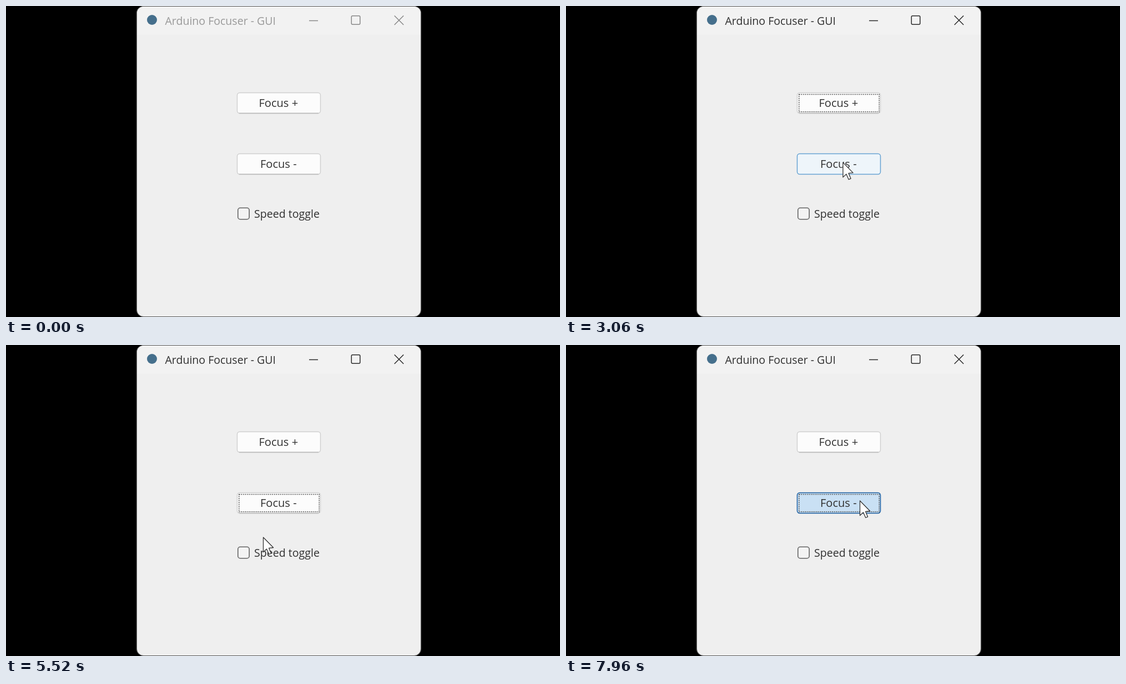
These frames come from a looping animation (998x561 px, 8 s). An HTML page:

```html
<!DOCTYPE html>
<html lang="en">
<head>
<meta charset="utf-8">
<title>Focuser window</title>
<style>
  html, body { margin: 0; width: 100%; height: 100%; overflow: hidden; background: #000; }
  svg { display: block; width: 100%; height: 100%; }
  text { font-family: "Open Sans", "Noto Sans", sans-serif; fill: #303030; }
  .button text { font-size: 20.1px; text-anchor: middle; }
  .dots { fill: none; stroke: #444; stroke-width: 1.5; stroke-dasharray: 1.75; }
</style>
</head>
<body>
<svg viewBox="0 0 998 561">
  <clipPath id="frame"><rect x="236" y="1" width="511" height="559" rx="12"/></clipPath>
  <rect x="235.5" y=".7" width="512" height="559.6" rx="12.5" fill="none" stroke="#555" stroke-width="1.6"/>
  <g clip-path="url(#frame)">
    <rect x="236" y="1" width="511" height="559" fill="#efefef"/>
    <rect x="236" y="1" width="511" height="51" fill="#f2f2f2"/>
    <circle cx="263" cy="25" r="9" fill="#456f8c"/>
    <text id="title" x="286.5" y="33.5" font-size="19.55">Arduino Focuser - GUI</text>
    <g id="controls" fill="none" stroke-width="1.5">
      <path d="M546 26.5H562M699.7 17.5L716.2 34M716.2 17.5L699.7 34"/>
      <rect x="622.3" y="17.7" width="15.5" height="15.5" rx="2"/>
    </g>

    <g class="button" id="plus" transform="translate(416 156)">
      <rect class="face" x=".5" y=".5" width="150" height="37" rx="4.5" stroke-width="1.5"/>
      <path class="edge" d="M4 37.5H147" stroke="#b8b8b8" stroke-width="1.5"/>
      <rect class="dots" x="3.8" y="3.6" width="144.4" height="31.2"/>
      <text x="74.8" y="26.3">Focus +</text>
    </g>
    <g class="button" id="minus" transform="translate(416 266)">
      <rect class="face" x=".5" y=".5" width="150" height="37" rx="4.5" stroke-width="1.5"/>
      <path class="edge" d="M4 37.5H147" stroke="#b8b8b8" stroke-width="1.5"/>
      <rect class="dots" x="3.8" y="3.6" width="144.4" height="31.2"/>
      <text x="74.8" y="26.3">Focus -</text>
    </g>

    <rect id="box" x="417.8" y="364.3" width="20.4" height="20.4" rx="4" stroke-width="1.6"/>
    <path id="tick" d="M422.5 375L426.5 379L433.5 371.5" fill="none" stroke="#fff" stroke-width="1.6"/>
    <text x="447" y="382" font-size="19.6">Speed toggle</text>
    <rect class="dots" id="labelDots" x="446.5" y="361" width="118.5" height="26.8"/>

    <path id="cursor" d="M.5 0V26.5L6.5 20.9L10.8 30.5L14.6 28.9L10.6 19.3L18.6 18.5Z"
          fill="#fff" stroke="#333" stroke-width="1.3" stroke-linejoin="round"/>
  </g>
</svg>
<script>
const DURATION = 8000, FADE = 140;
const $ = id => document.getElementById(id);
const clamp = v => Math.min(1, Math.max(0, v));
const mix = (a, b, k) => a + (b - a) * k;
const within = (t, from, to) => t >= from && t < to;

// Cursor stops: time, x, y
const path = [
  [100, 760, 300], [620, 516, 177], [1850, 516, 177], [2460, 507, 200],
  [2620, 507, 202], [3200, 497, 296], [5020, 497, 296], [5520, 463, 347],
  [5950, 445, 384], [6600, 445, 384], [6760, 445, 390], [7080, 445, 388],
  [7660, 529, 281], [8000, 529, 281]
];

const looks = {
  normal: { fill: [252, 252, 252], stroke: [208, 208, 208] },
  hover: { fill: [224, 238, 249], stroke: [0, 120, 212] },
  pressed: { fill: [201, 224, 244], stroke: [24, 91, 158] }
};

// Button states: start time, look
const plusStates = [[0, "normal"], [520, "hover"], [760, "pressed"], [1800, "hover"], [2200, "normal"]];
const minusStates = [
  [0, "normal"], [2990, "hover"], [3400, "pressed"], [4990, "hover"],
  [5130, "normal"], [7520, "hover"], [7720, "pressed"]
];

function cursorAt(t) {
  const i = path.findIndex(stop => stop[0] > t);
  if (i < 1) return path[0].slice(1);
  const [t0, x0, y0] = path[i - 1], [t1, x1, y1] = path[i];
  const k = (t - t0) / (t1 - t0), ease = k * k * (3 - 2 * k);
  return [mix(x0, x1, ease), mix(y0, y1, ease)];
}

function drawButton(id, states, t, focused) {
  const i = states.findLastIndex(state => state[0] <= t);
  const from = looks[states[Math.max(0, i - 1)][1]], to = looks[states[i][1]];
  const k = clamp((t - states[i][0]) / FADE);
  const color = key => `rgb(${from[key].map((v, n) => Math.round(mix(v, to[key][n], k)))})`;
  const face = $(id).querySelector(".face");
  face.setAttribute("fill", color("fill"));
  face.setAttribute("stroke", color("stroke"));
  const edgeOpacity = i === 0 ? 1 : k;
  $(id).querySelector(".edge").style.opacity = states[i][1] === "normal" ? edgeOpacity : 0;
  $(id).querySelector(".dots").style.opacity = focused ? 1 : 0;
}

function draw(t) {
  const active = t >= 760;
  $("title").style.fill = active ? "#303030" : "#999";
  $("controls").setAttribute("stroke", active ? "#2a2a2a" : "#888");

  const labelFocused = within(t, 6100, 7720);
  drawButton("plus", plusStates, t, within(t, 760, 3400));
  drawButton("minus", minusStates, t, within(t, 3400, 6100) || t >= 7720);

  const checked = within(t, 6200, 6960), hovered = within(t, 5700, 7200);
  $("box").setAttribute("fill", checked ? "#196abd" : hovered ? "#e8edf2" : "#f3f3f3");
  $("box").setAttribute("stroke", checked ? "#1765b5" : hovered ? "#0067c0" : "#646464");
  $("tick").style.opacity = checked ? 1 : 0;
  $("labelDots").style.opacity = labelFocused ? 1 : 0;

  $("cursor").setAttribute("transform", `translate(${cursorAt(t)})`);
}

function tick() {
  draw(performance.now() % DURATION);
  requestAnimationFrame(tick);
}
tick();
</script>
</body>
</html>
```
